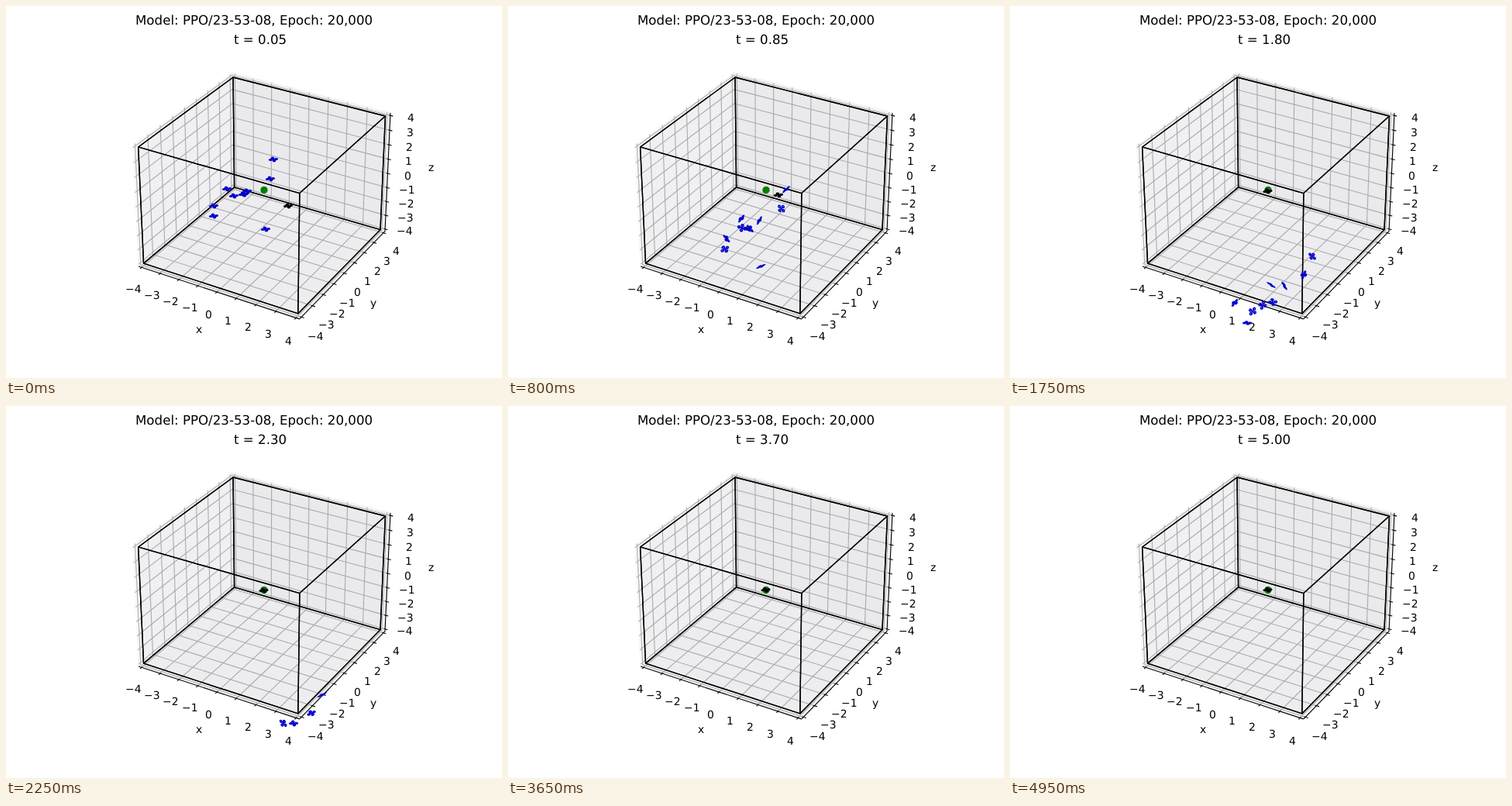
These frames come from a looping animation (640 px wide and 480 px high, 5 s). An HTML page:

```html
<!DOCTYPE html>
<html lang="en">
<head>
<meta charset="utf-8">
<title>3D flight plot</title>
<style>
html, body { margin: 0; width: 100%; height: 100%; overflow: hidden; background: #fff; }
svg { display: block; width: 640px; height: 480px; }
text { font-family: "DejaVu Sans", sans-serif; font-size: 13.889px; text-rendering: geometricPrecision; }
.title { font-size: 16.667px; }
.pane { stroke-width: 1.39; opacity: .5; }
.grid { fill: none; stroke: #b0b0b0; stroke-width: 1.11; }
.axis { fill: none; stroke: #000; stroke-width: 1.11; }
.cube { fill: #0a2864; fill-opacity: .015; stroke: #000; stroke-width: 1.39; stroke-linejoin: round; }
.drone { fill: none; stroke-width: 1.5; }
</style>
</head>
<body>
<svg id="stage" viewBox="0 0 640 480">
  <defs><clipPath id="area"><rect x="143.2" y="57.6" width="369.6" height="369.6"/></clipPath></defs>
</svg>
<script>
const stage = document.getElementById('stage');

function add(tag, attrs, parent = stage) {
  const el = document.createElementNS('http://www.w3.org/2000/svg', tag);
  for (const k in attrs) el.setAttribute(k, attrs[k]);
  parent.appendChild(el);
  return el;
}

// Text centred on x, starting on a whole pixel
function label(x, y, str, cls = '') {
  const el = add('text', { y: Math.round(y), class: cls });
  el.textContent = str;
  el.setAttribute('x', Math.round(x - el.getComputedTextLength() / 2));
  return el;
}

// Perspective camera: elevation 30, azimuth -60, distance 10
function project([x, y, z]) {
  const r = Math.sqrt(3) / 2;
  x /= 7; y /= 7; z *= 3 / 28;
  const right = r * x + y / 2;
  const up = -x / 4 + r / 2 * y + r * z;
  const near = r / 2 * x - .75 * y + z / 2;
  const k = 1997.8 / (10 - near);
  return [333 + k * right, 237.4 - k * up];
}

const line = (...pts) => 'M' + pts.map(p => project(p).map(v => v.toFixed(2))).join('L');

// The square across axis i at position s, with half-size h
function face(i, s, h) {
  const corners = [[-h, -h], [h, -h], [h, h], [-h, h]].map(p => {
    p.splice(i, 0, s);
    return p;
  });
  return line(...corners) + 'Z';
}

function drawBox() {
  const L = 4, E = L + 1 / 6;
  ['#f2f2f2', '#e6e6e6', '#ececec'].forEach((fill, i) =>
    add('path', { class: 'pane', fill, stroke: fill, d: face(i, i === 1 ? E : -E, E) }));

  const axes = [
    { name: 'x', at: (v, e) => [v, -e, -e], tick: (v, d) => [v, -E - d, -E],
      grid: v => [[v, E, E], [v, E, -E], [v, -E, -E]] },
    { name: 'y', at: (v, e) => [e, v, -e], tick: (v, d) => [E + d, v, -E],
      grid: v => [[-E, v, E], [-E, v, -E], [E, v, -E]] },
    { name: 'z', at: (v, e) => [e, e, v], tick: (v, d) => [E + d, E, v],
      grid: v => [[-E, -E, v], [-E, E, v], [E, E, v]] }
  ];
  for (const a of axes) {
    add('path', { class: 'axis', d: line(a.at(-E, E), a.at(E, E)) });
    const [nx, ny] = project(a.at(0, 5.67));
    label(nx, ny + 4, a.name);
    for (let v = -L; v <= L; v++) {
      add('path', { class: 'grid', d: line(...a.grid(v)) });
      add('path', { class: 'axis', d: line(a.tick(v, 2 / 15), a.tick(v, -1 / 15)) });
      const [x, y] = project(a.at(v, 4.858));
      label(x, y + 11, String(v).replace('-', '\u2212'));
    }
  }

  for (let i = 0; i < 3; i++) {
    for (const s of [-L, L]) add('path', { class: 'cube', d: face(i, s, L) });
  }
}

// Distance fallen against drag, scaled to 1 after 1.75 s
const drop = t => t - .55 * (1 - Math.exp(-t / .55));
const fall = t => drop(t) / drop(1.75);

function smooth(u) {
  u = Math.min(1, u);
  return u * u * (3 - 2 * u);
}

// Falling drones: start x, y and x, y after 1.75 s
const falling = [
  [345, 198, 390, 323],
  [341, 223, 379, 347],
  [285, 236, 337, 360],
  [294, 245, 339, 382],
  [307, 243, 290, 383],
  [311, 239, 354, 361],
  [268, 258, 313, 394],
  [268, 271, 306, 409],
  [335, 288, 307, 443],
  [306, 243, 326, 386]
];

function tumble([x0, y0, x1, y1], i, t) {
  const u = fall(t), grow = smooth(t / .4), phase = 2.4 * i;
  return {
    x: x0 + (x1 - x0) * u,
    y: y0 + (y1 - y0) * u,
    roll: -60 * grow * Math.sin(phase + 3 * t),
    flat: .5 + .35 * grow * Math.sin(1.7 * phase + 5 * t)
  };
}

// The steered drone glides to the goal and hovers there
const hover = t => ({
  x: 364 - 31.5 * smooth(t / 1.65),
  y: 237.2 + 20.8 * Math.exp(-t / .7),
  roll: 0,
  flat: .5
});

// Four rotor rings and two arms, flattened and rolled
function droneShape({ x, y, roll, flat }) {
  const rad = Math.PI / 180, cos = Math.cos(roll * rad), sin = Math.sin(roll * rad);
  const polar = (r, deg) => [r * Math.cos(deg * rad), -r * Math.sin(deg * rad)];
  const out = (px, py) => {
    py *= flat;
    return (x + px * cos - py * sin).toFixed(2) + ' ' + (y + px * sin + py * cos).toFixed(2);
  };
  let d = '';
  for (let k = 0; k < 4; k++) {
    const [cx, cy] = polar(3.8, 15 + 90 * k);
    const ring = [];
    for (let deg = 0; deg < 360; deg += 45) {
      const [rx, ry] = polar(1.6, deg);
      ring.push(out(cx + rx, cy + ry));
    }
    d += 'M' + ring.join('L') + 'Z';
    if (k < 2) d += 'M' + out(cx, cy) + 'L' + out(-cx, -cy);
  }
  return d;
}

drawBox();
label(320, 24, 'Model: PPO/23-53-08, Epoch: 20,000', 'title');
const clock = label(328, 49, 't = 0.05', 'title');
const layer = add('g', { 'clip-path': 'url(#area)' });
add('circle', { cx: 333, cy: 237.4, r: 4.7, fill: '#008000' }, layer);

const addDrone = (stroke, pose) => ({ pose, el: add('path', { class: 'drone', stroke }, layer) });
const drones = falling.map((path, i) => addDrone('#0000cd', t => tumble(path, i, t)));
drones.push(addDrone('#000', hover));

const start = performance.now();
let shown = -1;
function render() {
  const step = Math.floor(Math.max(0, performance.now() - start) % 5000 / 50);
  if (step !== shown) {
    shown = step;
    clock.textContent = 't = ' + ((step + 1) * .05).toFixed(2);
    for (const { pose, el } of drones) el.setAttribute('d', droneShape(pose(step * .05)));
  }
  requestAnimationFrame(render);
}
render();
</script>
</body>
</html>
```
